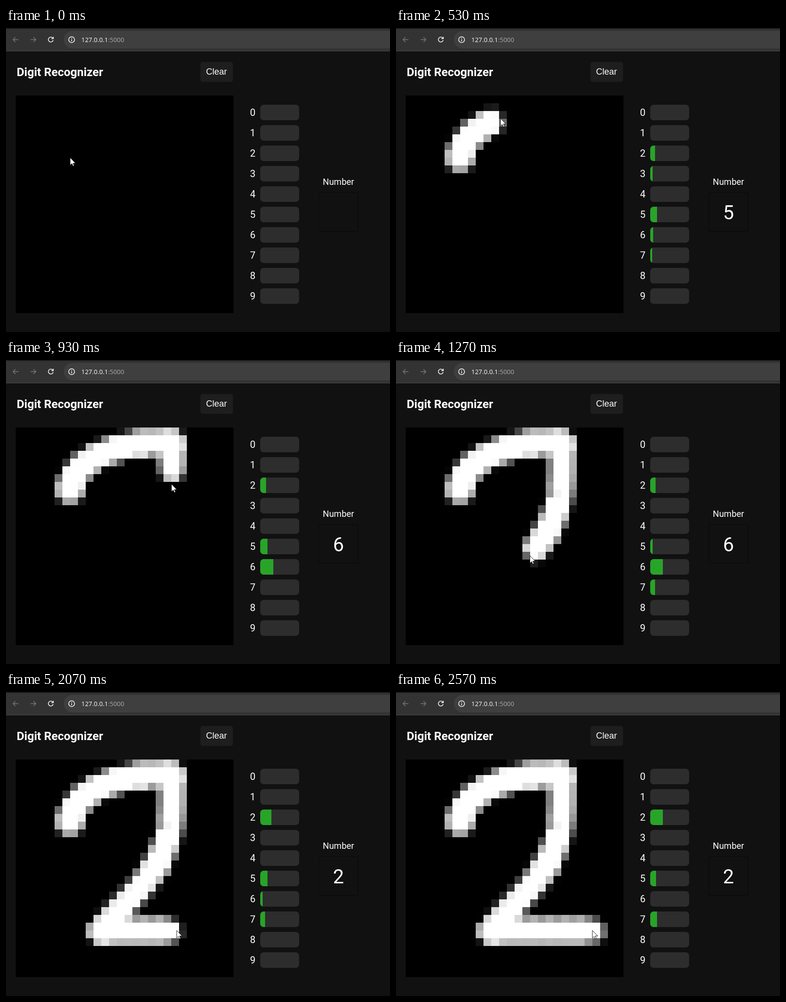
Recreate the animation shown at these times as an HTML page with a canvas. Size 790 by 626 pixels, loop 2600 ms.

```html
<!DOCTYPE html>
<html lang="en">
<head>
<meta charset="utf-8">
<title>Digit Recognizer</title>
<style>
  html, body { margin: 0; width: 100%; height: 100%; overflow: hidden; background: #111; }
  canvas { position: absolute; left: 20px; top: 139px; width: 448px; height: 448px; background: #000; image-rendering: pixelated; }
  svg { position: absolute; left: 0; top: 0; }
  text { fill: #fff; font-family: Roboto, sans-serif; }
  .title { font-size: 24px; font-weight: 700; }
  .clear { font-size: 18px; font-family: "Liberation Sans", Arial, sans-serif; }
  .url { font-size: 13px; font-family: "Open Sans", sans-serif; }
  .port { fill: #aaa; }
  .label { font-size: 20px; }
  .caption { font-size: 18px; }
  #guess { font-size: 40px; }
  .icon { fill: none; stroke: #f0f0f0; stroke-width: 1.6; }
  .dim { stroke: #777; stroke-width: 1.4; }
</style>
</head>
<body>
<canvas id="pad" width="28" height="28"></canvas>
<svg width="790" height="626" viewBox="0 0 790 626">
  <defs><clipPath id="round"><rect width="80" height="32" rx="7"/></clipPath></defs>

  <rect width="790" height="47" fill="#333"/>
  <rect width="790" height="2" fill="#1c1c1c"/>
  <rect y="47" width="790" height="1" fill="#484848"/>
  <path d="M790 6H137a18 18 0 0 0 0 36H790Z" fill="#3f3f3f"/>
  <path class="icon dim" d="M25.500 24H14.500M19.500 19L14.500 24L19.500 29"/>
  <path class="icon dim" d="M50.500 24H61.500M56.500 19L61.500 24L56.500 29"/>
  <path class="icon" d="M96.300 21A5 5 0 1 0 97 25M97.300 18V22H93.300"/>
  <circle class="icon" cx="135" cy="24" r="6"/>
  <path class="icon" d="M135 23.300V27.300M135 20.500V22"/>
  <text class="url" x="155" y="28.500">127.0.0.1<tspan class="port">:5000</tspan></text>

  <text class="title" x="22" y="99">Digit Recognizer</text>
  <rect x="400" y="70" width="67" height="41" rx="5" fill="#1e1e1e"/>
  <text class="clear" x="411.500" y="96">Clear</text>

  <g id="bars"></g>
  <text class="caption" x="684" y="323" text-anchor="middle">Number</text>
  <rect x="643.500" y="338.500" width="81" height="80" fill="none" stroke="#080808"/>
  <text id="guess" x="684" y="394" text-anchor="middle"></text>

  <path id="cursor" d="M0 0V15.500L3.600 12.300L6 17.500L8.300 16.500L6 11.400H11Z" fill="#fff" stroke="#111" stroke-width=".9"/>
</svg>
<script>
const LOOP = 2600, CELL = 16, LEAD = 45;
const $ = id => document.getElementById(id);
const ctx = $('pad').getContext('2d');

// Cubic curves in pad cells; each is inked in a few overlapping parts
const strokes = [
  { from: 290, to: 870, parts: 6, x: [7, 7, 12, 20], y: [8, 5, 1.5, 2] },
  { from: 870, to: 1640, parts: 2, x: [20, 20.8, 17.5, 11.1], y: [2, 13, 14.5, 22] },
  { from: 1740, to: 2350, parts: 7, x: [11.1, 15, 20, 24], y: [22, 22, 22, 22] }
];

// Bar widths by digit at the key times
const times = [290, 530, 930, 1270, 1700, 2070, 2400];
const widths = {
  2: [0, 10, 12, 11, 37, 23, 26],
  3: [0, 5, 0, 0, 0, 0, 0],
  5: [0, 14, 15, 5, 11, 15, 12],
  6: [0, 6, 27, 26, 28, 5, 0],
  7: [0, 4, 0, 10, 9, 10, 14]
};

const clamp = v => Math.min(1, Math.max(0, v));
const share = (t, from, to) => clamp((t - from) / (to - from));
const progress = (s, t) => 1 - (1 - share(t, s.from, s.to)) ** 1.4;

const cubic = ([a, b, c, d], u) => {
  const v = 1 - u;
  return a * v ** 3 + 3 * b * v * v * u + 3 * c * v * u * u + d * u ** 3;
};
const point = (s, u) => [cubic(s.x, u), cubic(s.y, u)];

$('bars').innerHTML = Array.from({ length: 10 }, (_, d) => `
  <text class="label" x="502" y="${181 + 42 * d}">${d}</text>
  <g transform="translate(523 ${158 + 42 * d})" clip-path="url(#round)">
    <rect width="80" height="32" fill="#2d2d2d"/>
    <rect class="fill" width="0" height="32" fill="#28a428"/>
  </g>`).join('');
const fills = document.querySelectorAll('.fill');

ctx.lineWidth = 3.2;
ctx.lineCap = ctx.lineJoin = 'round';
ctx.strokeStyle = '#fff';

function inkPart(s, a, b) {
  ctx.beginPath();
  for (let i = 0; i <= 8; i++) ctx.lineTo(...point(s, a + (b - a) * i / 8));
  ctx.stroke();
}

function drawInk(t) {
  ctx.clearRect(0, 0, 28, 28);
  for (const s of strokes) {
    const u = progress(s, t);
    if (u > 0) inkPart(s, 0, 0.001);
    for (let i = 0; i / s.parts < u; i++) {
      inkPart(s, i / s.parts, Math.min(u, (i + 1) / s.parts));
    }
  }
}

function drawScores(t) {
  const i = Math.max(1, times.findLastIndex(k => k <= t) + 1);
  const k = i < times.length ? share(t, times[i - 1], times[i]) : 1;
  let best = '', top = 0;
  for (const [d, w] of Object.entries(widths)) {
    const last = w[i] ?? w.at(-1);
    const now = w[i - 1] + (last - w[i - 1]) * k;
    fills[d].setAttribute('width', now);
    if (now > top) [top, best] = [now, d];
  }
  $('guess').textContent = best;
}

// The pointer runs slightly ahead of the ink
function drawCursor(t) {
  const s = strokes.findLast(s => s.from <= t + LEAD) || strokes[0];
  const [x, y] = point(s, progress(s, t + LEAD));
  $('cursor').setAttribute('transform', `translate(${20 + CELL * x} ${139 + CELL * y})`);
}

function frame() {
  const t = performance.now() % LOOP;
  drawInk(t);
  drawScores(t);
  drawCursor(t);
  requestAnimationFrame(frame);
}
frame();
</script>
</body>
</html>
```
